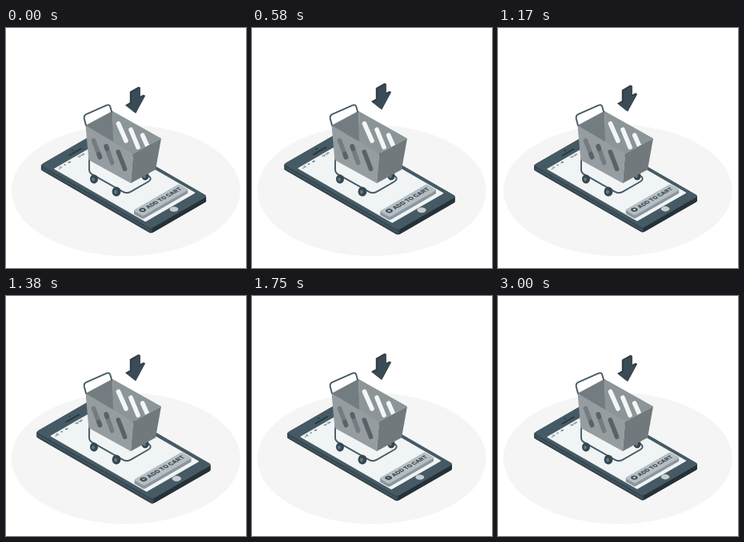
Animation of 300 by 300 pixels, one loop 3040 ms. Source, as an HTML page:

```html
<!DOCTYPE html>
<html lang="en">
<head>
<meta charset="utf-8">
<title>Add to cart</title>
<style>
  html, body { margin: 0; width: 100%; height: 100%; overflow: hidden; background: #fff; }
  svg { display: block; width: 100vw; height: 100vh; }
  text { font-family: Inter, "Open Sans", sans-serif; font-weight: 800; fill: #37474f; }
  .line { fill: none; stroke: #455a64; stroke-width: 1.9; stroke-linecap: round; stroke-linejoin: round; }
  .slot { fill: none; stroke-width: 5.6; stroke-linecap: round; }
</style>
</head>
<body>
<svg viewBox="0 0 300 300">
  <ellipse cx="149.8" cy="203" rx="143" ry="82" fill="#f5f5f5"/>

  <g id="phone">
    <g id="body"></g>
    <path d="M47.5 176L180 252.4" stroke="#546e7a" stroke-width=".7"/>
    <!-- flat plane: x runs across the phone, y along it -->
    <g transform="matrix(1 -.577 1 .577 44.5 171.3)">
      <rect width="69.5" height="136.5" rx="3" fill="#455a64"/>
      <rect x="3.9" y="12.5" width="61.7" height="113.1" rx=".8" fill="#f0f4f5"/>
      <path d="M28 7.8H42.5" stroke="#263238" stroke-width="1.5" stroke-linecap="round"/>
      <circle cx="35.4" cy="3.9" r=".9" fill="#263238"/>
      <circle cx="34.8" cy="129.8" r="3.8" fill="#c5cbce"/>
      <g fill="#607d8b">
        <path d="M6.6 15.4h1v1h-1zM8.2 14.6h1v1.8h-1zM9.8 13.8h1v2.6h-1z"/>
        <circle cx="15" cy="15" r=".9"/>
        <rect x="19.4" y="14.2" width="2.6" height="1.7"/>
      </g>
      <text x="31" y="16.2" font-size="2.9">12:30</text>
    </g>
    <g id="button"></g>
    <g transform="matrix(1 -.577 1 .577 44.5 167.3)">
      <rect x="5" y="109.4" width="56.2" height="12" rx="1.6" fill="#b5bec3"/>
      <circle cx="11.2" cy="114.7" r="3" fill="#37474f"/>
      <path d="M9.5 114.7h3.4M11.2 113v3.4" stroke="#cfd8dc" stroke-width=".8"/>
      <text x="16" y="117" font-size="6.1">ADD TO CART</text>
    </g>
  </g>

  <g id="cart">
    <path class="line" d="M104 160V177Q104 181 108 183.2L146 204.6Q151 207.4 156 204.6L178 192Q182.5 189 179.5 186L175 182.5"/>
    <g id="wheels"></g>
    <path fill="#737d81" d="M99.5 121.8L133 103.8L135 146L120 150Z"/>
    <path fill="#8c9598" d="M133 103.8L194 138L159 157L134 144Z"/>
    <path class="slot" stroke="#f3f5f6" d="M140.5 119.5L150 141M156 127L165 149M170.7 134L180 155"/>
    <path fill="#969da0" d="M99.5 121.8L159 157L156 194L103.4 165Z"/>
    <path fill="#71797d" d="M159 157L194 138L187 177L156 194Z"/>
    <path class="slot" stroke="#737d81" d="M109.5 140.5L117.5 161.5M125.3 148L132.6 168.5"/>
    <path class="slot" stroke="#596266" d="M116 157.5L117.5 161.5M125.3 148L126.3 151M140.3 154.8L148.6 176.2"/>
    <path class="line" d="M100 121.5L97.8 113.4Q97 109.6 100.2 107.8L125.6 96.6Q129.4 95.2 130.4 98.8L132 104.5"/>
  </g>

  <g id="arrow">
    <path id="arrowBack" fill="#2f3d45"/>
    <path id="arrowFace" fill="#3a4b55"/>
  </g>
</svg>
<script>
  const $ = id => document.getElementById(id);
  const iso = dy => `transform="matrix(1 -.577 1 .577 44.5 ${171.3 + dy})"`;

  // Stack copies of a flat rounded plate to give it thickness.
  function plate(from, to, attrs, fill) {
    let out = "";
    for (let dy = from; dy >= to; dy -= 0.5) {
      out += `<rect ${iso(dy)} ${attrs} fill="${fill}"/>`;
    }
    return out;
  }
  // The short side is darker than the long one.
  $("body").innerHTML =
    plate(6, 0.5, 'width="69.5" height="136.5" rx="3"', "#263238") +
    plate(6, 0.5, 'width="2.4" height="136" rx="1.2"', "#37474f");
  $("button").innerHTML =
    plate(0, -3.5, 'x="5" y="109.4" width="56.2" height="12" rx="1.6"', "#8b979d");

  const wheels = [[110, 188.8, 5], [138, 204.6, 5.4], [174, 185, 4.6]];
  $("wheels").innerHTML = wheels.map(([x, y, r]) =>
    `<ellipse cx="${x}" cy="${y}" rx="${r}" ry="${r + 0.6}" fill="#37474f"/>
     <ellipse cx="${x - 1}" cy="${y + 0.4}" rx="${r * 0.35}" ry="${r * 0.45}" fill="#607d8b"/>`
  ).join("");

  const face = [[156.8, 81], [167.8, 74.7], [167.8, 88], [174.2, 84.6],
                [162.2, 106.8], [151, 97.9], [156.8, 94.6]];
  const outline = (dx, dy) =>
    "M" + face.map(([x, y]) => `${x + dx} ${y + dy}`).join("L") + "Z";
  $("arrowFace").setAttribute("d", outline(0, 0));
  $("arrowBack").setAttribute("d",
    [0, 0.5, 1, 1.5, 2].map(k => outline(-k, -k * 0.577)).join(""));

  const LOOP = 3040;
  const beats = [[0, 1], [300, 1.1], [900, 1], [1200, 1], [1500, 1.1], [1800, 1], [3000, 1]];

  function at(steps, t) {
    for (let i = 1; i < steps.length; i++) {
      const [t0, a] = steps[i - 1], [t1, b] = steps[i];
      if (t <= t1) return a + (b - a) * (t - t0) / (t1 - t0);
    }
    return steps[steps.length - 1][1];
  }

  function draw(ms) {
    const t = 40 + (ms % LOOP) * 2960 / 3000;
    const scale = at(beats, t);
    const lift = 6 * (1 - Math.abs((t % 1500) / 750 - 1));
    $("phone").setAttribute("transform",
      `translate(147.7 195) scale(${scale}) translate(-147.7 -195)`);
    $("arrow").setAttribute("transform", `translate(0 ${-lift})`);
  }

  const start = performance.now();
  function tick() {
    draw(performance.now() - start);
    requestAnimationFrame(tick);
  }
  tick();
</script>
</body>
</html>
```
